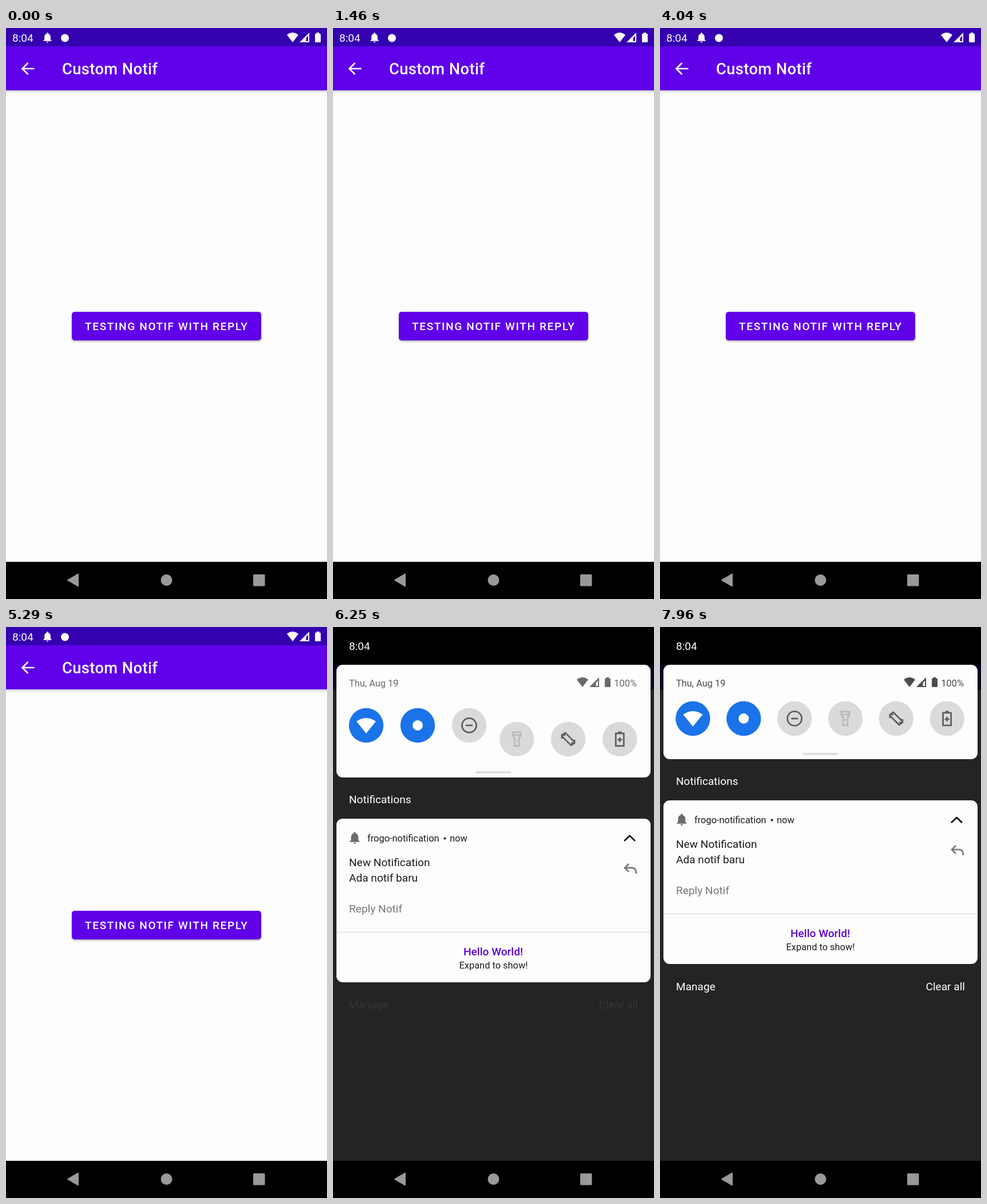
An HTML page that plays this animation: 561 by 998 pixels, repeating every 8000 ms.

```html
<!DOCTYPE html>
<html lang="en">
<head>
<meta charset="utf-8">
<title>Custom Notif</title>
<style>
html, body { margin: 0; width: 100%; height: 100%; overflow: hidden; background: #000; }
svg { display: block; width: 561px; height: 998px; font-family: Roboto, sans-serif; font-size: 19.1px; }
.s { font-size: 16.4px; }
.m { font-weight: 500; }
.line { fill: none; stroke-width: 2.7; }
</style>
</head>
<body>
<svg viewBox="0 0 561 998" xmlns="http://www.w3.org/2000/svg">
  <defs>
    <path id="bell" d="M12 22c1.1 0 2-.9 2-2h-4c0 1.1.89 2 2 2zm6-6v-5c0-3.07-1.64-5.64-4.5-6.32V4c0-.83-.67-1.5-1.5-1.5s-1.5.67-1.5 1.5v.68C7.63 5.36 6 7.92 6 11v5l-2 2v1h16v-1l-2-2z"/>
    <g id="status">
      <path d="M491 12Q501 4 511 12L501 25z"/>
      <path d="M513 25L530 8V25z M524.5 17.5V23H528V13.8z" fill-rule="evenodd"/>
      <path d="M542.500 8h5v2h1.500q1 0 1 1v13q0 1-1 1h-8q-1 0-1-1v-13q0-1 1-1h1.500z"/>
    </g>
    <linearGradient id="drop" x2="0" y2="1">
      <stop stop-color="#000" stop-opacity=".16"/>
      <stop offset="1" stop-color="#000" stop-opacity="0"/>
    </linearGradient>
    <filter id="blur" x="-5%" y="-20%" width="110%" height="150%"><feGaussianBlur stdDeviation="1.500"/></filter>
    <clipPath id="topClip"><rect id="topBox" x="6" y="303" width="549"/></clipPath>
    <clipPath id="lowClip"><rect id="lowBox" x="6" width="549"/></clipPath>
    <clipPath id="panelClip"><rect id="panelBox" width="561"/></clipPath>
  </defs>

  <g id="page">
    <rect width="561" height="998" fill="#fdfdfd"/>
    <rect y="109" width="561" height="6" fill="url(#drop)"/>
    <rect y="32" width="561" height="77" fill="#5f00e9"/>
    <rect width="561" height="32" fill="#3400b0"/>
    <g fill="#fff">
      <text x="11" y="24">8:04</text>
      <use href="#bell" transform="translate(61.700 5.700) scale(.9)"/>
      <circle cx="103" cy="17.500" r="7"/>
      <use href="#status"/>
      <path class="line" stroke="#fff" d="M49.500 71H29M38.500 61L28.500 71L38.500 81"/>
      <text class="m" x="98" y="81" font-size="27.300" letter-spacing=".4">Custom Notif</text>
    </g>
    <rect x="115" y="498" width="331" height="50" rx="5" opacity=".28" filter="url(#blur)"/>
    <rect x="115" y="496" width="331" height="50" rx="5" fill="#5f00e9"/>
    <text class="m" x="138" y="528" fill="#fff" letter-spacing="1.620">TESTING NOTIF WITH REPLY</text>
  </g>

  <g id="shade">
    <rect id="scrim" width="561" height="933"/>
    <g id="panel" clip-path="url(#panelClip)">
      <g id="header">
        <rect y="-100" width="561" height="166"/>
        <text x="28" y="40" fill="#fff">8:04</text>
        <rect id="qs" x="6" y="66" width="549" rx="11" fill="#fdfdfd"/>
        <g id="info" fill="#4c4c4c">
          <text class="s" x="28" y="103.500">Thu, Aug 19</text>
          <use href="#status" x="-65" y="80"/>
          <text class="s" x="531" y="103.500" text-anchor="end">100%</text>
        </g>
        <g id="tiles"></g>
        <rect id="grip" x="249" width="62" height="4" rx="2" fill="#dedede"/>
      </g>
      <g id="list">
        <text x="28" y="276" fill="#fff">Notifications</text>
        <rect id="card" x="6" y="303" width="549" rx="11" fill="#fdfdfd"/>
        <g clip-path="url(#topClip)" fill="#1c1c1c">
          <use href="#bell" transform="translate(25.200 323.600) scale(1.060)" fill="#6b6b6b"/>
          <g class="s">
            <text x="60" y="343">frogo-notification</text>
            <circle cx="195.500" cy="337.500" r="2"/>
            <text x="204" y="343">now</text>
          </g>
          <path class="line" stroke="#000" d="M509 342L518.500 333L528 342"/>
          <text x="28" y="386">New Notification</text>
          <text x="28" y="413">Ada notif baru</text>
          <text x="28" y="467" fill="#777">Reply Notif</text>
          <path class="line" stroke="#777" d="M517 382L510 389L517 396M510 389H522Q530 389 530 399"/>
        </g>
        <g id="low" clip-path="url(#lowClip)" text-anchor="middle">
          <text class="m" x="280" y="542" fill="#5a00d8">Hello World!</text>
          <text class="s" x="280.500" y="565" fill="#1c1c1c">Expand to show!</text>
        </g>
        <circle id="shelf" cx="57" r="6.500" fill="#777"/>
        <rect id="rule" x="6" width="549" height="1" fill="#d4d4d4"/>
        <g id="footer" fill="#fff">
          <text x="28" y="635">Manage</text>
          <text x="533" y="635" text-anchor="end">Clear all</text>
        </g>
      </g>
    </g>
  </g>

  <g fill="#999">
    <rect y="933" width="561" height="65" fill="#000"/>
    <path d="M108 965L126 954.500V975.500z" stroke="#999" stroke-width="2" stroke-linejoin="round"/>
    <circle cx="280.500" cy="965" r="10"/>
    <rect x="432" y="955" width="20.500" height="20.500" rx="1.500"/>
  </g>
</svg>
<script>
const LOOP = 8000, OPEN = 5630, STEP = 40;
const $ = id => document.getElementById(id);
const clamp = (v, lo = 0, hi = 1) => Math.min(hi, Math.max(lo, v));
const put = (id, attrs) => {
  for (const k in attrs) $(id).setAttribute(k, attrs[k]);
};
const shift = (x, y) => `translate(${x} ${y})`;

// Resting x, x when pulled, drop when pulled, disc colour, icon
const dark = 'class="line" stroke="#5c5c5c"';
const tiles = [
  [57.5, 58, 12, '#1a73e8', '<path fill="#fff" d="M-17-7Q0-19 17-7L0 14z"/>'],
  [146.3, 148, 12, '#1a73e8', '<circle r="9" fill="#fff"/>'],
  [235.2, 238, 12, '#dadada', `<g ${dark}><circle r="12.500"/><path d="M-6 0H6"/></g>`],
  [324, 321.2, 36, '#dadada', '<path class="line" stroke="#b8b8b8" d="M-7-12H7V-6L4-2V12H-4V-2L-7-6zM-7-7H7M0 1V4"/>'],
  [412.8, 411, 36, '#dadada', `<path ${dark} d="M-11-1V-7H-5M-11-7L-5-11L10 4M11 1V7H5M11 7L5 11L-10-4"/>`],
  [501.6, 501.2, 36, '#dadada', `<g ${dark}><path d="M-7-10H7V12H-7zM-4 1H4M0-3V5"/><path d="M-3-12H3"/></g>`]
];
$('tiles').innerHTML = tiles.map(([, , , color, icon]) =>
  `<g><circle r="30.200" fill="${color}"/>${icon}</g>`).join('');
const discs = [...$('tiles').children];

function draw(time) {
  const open = time >= OPEN;
  $('shade').style.display = open ? '' : 'none';
  if (!open) return;
  const t = OPEN + Math.floor((time - OPEN) / STEP) * STEP;

  // Reach of the shade while it is flung open
  const u = clamp((t - 5590) / 320);
  const reach = 621 * (1 - (1 - u) ** 2.5);
  const slide = Math.min(0, (reach - 400) * 0.3);

  // Extra pull past the end, then release
  const pull = (1 + Math.cos(Math.PI * clamp((t - 6245) / 400, -1, 1))) / 2;
  const extra = pull * 32;

  put('scrim', { opacity: Math.min(0.857, reach / 431 * 0.812) });
  put('panelBox', { height: u < 0.7 ? reach : 998 });
  put('header', { transform: shift(0, slide) });
  put('list', { transform: shift(0, slide + extra) });
  put('qs', { height: 165 + extra });
  put('grip', { y: 220 + extra });
  put('info', { opacity: 1 - pull * 0.17 });
  discs.forEach((disc, i) => {
    const [x0, x1, drop] = tiles[i];
    disc.setAttribute('transform', shift(x0 + (x1 - x0) * pull, 160 + drop * pull));
  });

  // Bottom shelf gives way to the second notification
  const bottom = clamp(reach - slide, 303, 589);
  const split = clamp(bottom - 44, 303, 501);
  const shown = clamp((bottom - 501) / 70);
  put('card', { height: bottom - 303 });
  put('topBox', { height: split - 303 });
  put('lowBox', { y: split, height: bottom - split });
  put('low', { opacity: shown });
  put('shelf', { cy: bottom - 20, opacity: bottom > 340 ? 1 - shown : 0 });
  put('rule', { y: split, opacity: bottom > 347 ? 1 : 0 });
  put('footer', { opacity: clamp((t - 6200) / 400) });
}

function tick(now) {
  draw(now % LOOP);
  requestAnimationFrame(tick);
}
draw(0);
requestAnimationFrame(tick);
</script>
</body>
</html>
```
